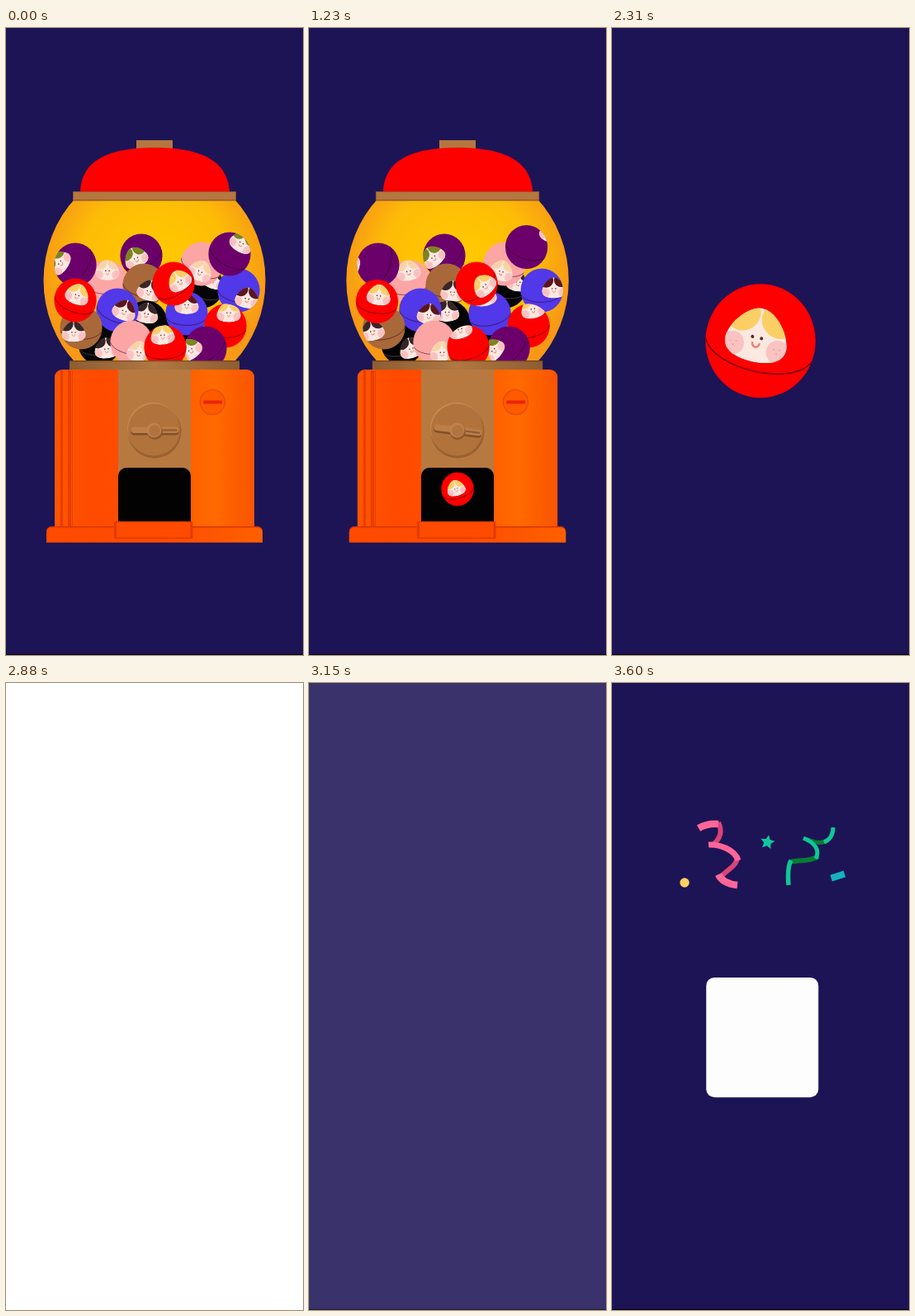
These frames come from a looping animation (360 px wide and 760 px high, 4.5 s). An HTML page with a canvas:

```html
<!DOCTYPE html>
<html lang="en">
<head>
<meta charset="utf-8">
<title>Capsule machine</title>
<style>
html, body { margin: 0; width: 100%; height: 100%; overflow: hidden; background: #1d1456; }
canvas { display: block; width: 100%; height: 100%; }
</style>
</head>
<body>
<canvas id="stage"></canvas>
<script>
const W = 360, H = 760, LOOP = 4500, STEP = 30;
const canvas = document.getElementById('stage');
const ratio = window.devicePixelRatio || 1;
canvas.width = W * ratio;
canvas.height = H * ratio;
const c = canvas.getContext('2d');
c.scale(ratio, ratio);

const NAVY = '#1d1456', BROWN = '#b5763f', STRETCH = 1.035;
const KINDS = {
  red: ['#fe0000', '#fbcf66'],
  purple: ['#6b006b', '#7d8420'],
  blue: ['#5138e8', '#5a1620'],
  brown: ['#a9683a', '#3a2628'],
  pink: ['#fca5a5', '#f8d3a8'],
  black: ['#050505', '#352526']
};

// kind, centre, face offset at rest, face offset when shaken, tilt, travel
const BALLS = [
  ['black', 238, 313, 13, -7, 8, -14, 20],
  ['pink', 237, 286, -2, 10, 3, 10, 25],
  ['pink', 122, 308, 1, -12, 5, -13, 0],
  ['purple', 164, 276, -6, 4, 8, 7, -25],
  ['brown', 167, 312, 6, 8, 4, 6, 15],
  ['black', 205, 372, 50, 0, 50, 0, 0],
  ['black', 170, 357, 0, -9, 5, -5, 10],
  ['black', 113, 382, 9, 8, 4, 9, -5],
  ['blue', 135, 342, 8, 2, 3, -8, 20],
  ['blue', 219, 346, 0, -9, 13, 11, 0],
  ['blue', 282, 318, 10, 11, 0, 36, 10],
  ['purple', 271, 274, 14, -12, -20, -6, 30, 16, 18],
  ['purple', 84, 287, -18, -2, 14, -13, -55],
  ['brown', 91, 363, -9, 7, 1, 10, 0],
  ['red', 84, 330, 2, -5, 2, -4, 20, 3, -3],
  ['red', 203, 310, 8, -2, 3, -13, -30],
  ['red', 266, 361, 4, -14, 1, -4, 0],
  ['pink', 152, 381, 9, 13, 8, 13, 10],
  ['purple', 242, 388, -18, 3, -18, 3, -35],
  ['red', 193, 387, -3, -13, 11, 2, -5]
];

const clamp = v => Math.max(0, Math.min(1, v));
const part = (t, from, to) => clamp((t - from) / (to - from));
const ease = v => v < .5 ? 2 * v * v : 1 - 2 * (1 - v) * (1 - v);
const mix = (a, b, v) => a + (b - a) * v;
const rad = deg => deg * Math.PI / 180;

function fill(color, x, y, w, h, r = 0) {
  c.fillStyle = color;
  c.beginPath();
  c.roundRect(x, y, w, h, r);
  c.fill();
}

function oval(color, x, y, rx, ry = rx) {
  c.fillStyle = color;
  c.beginPath();
  c.ellipse(x, y, rx, ry, 0, 0, 7);
  c.fill();
}

function stroke(color, width, path) {
  c.strokeStyle = color;
  c.lineWidth = width;
  c.stroke(new Path2D(path));
}

function shade(x0, x1, ...stops) {
  const g = c.createLinearGradient(x0, 0, x1, 0);
  stops.forEach((color, i) => g.addColorStop(i / (stops.length - 1), color));
  return g;
}

const FACE = new Path2D('M0-38C18-38 38-12 38 4C38 20 20 26 0 26C-20 26-38 20-38 4C-38-12-18-38 0-38Z');

function drawFace(hair) {
  c.clip(FACE);
  c.fillStyle = '#fbe8e1';
  c.fill(FACE);
  for (const side of [-1, 1]) {
    oval(hair, side * 24, -29, 23, 22);
    oval('#f9c3c1', side * 28, 9, 14);
    for (const [x, y] of [[-4, 7], [3, 6], [0, 11]]) oval('#ee9a98', side * 27 + x, y, 1);
    oval('#5a2a22', side * 5.6, -3, 2);
  }
  stroke('#ef7f72', 2.4, 'M-4.500 3C-4.500 10 4.500 10 4.500 3');
}

function drawBall(kind, x, y, r, deg, fx, fy) {
  const [color, hair] = KINDS[kind], s = r / 67;
  c.save();
  c.translate(x, y);
  c.scale(s, s * STRETCH);
  oval(color, 0, 0, 67);
  c.clip();
  c.save();
  c.rotate(rad(deg));
  stroke(kind === 'black' ? '#4b3c40' : 'rgba(45,0,18,.65)', Math.max(1.5, .8 / s), 'M-66 11C-50 45 50 45 66 11');
  c.restore();
  c.translate(fx / s, fy / s);
  c.rotate(rad(deg));
  drawFace(hair);
  c.restore();
}

function drawGlobe(pose) {
  c.save();
  c.beginPath();
  c.rect(40, 205, 280, 200);
  c.clip();
  const glow = c.createRadialGradient(180, 285, 20, 180, 290, 140);
  glow.addColorStop(0, '#ffc800');
  glow.addColorStop(.6, '#fdbb06');
  glow.addColorStop(1, '#f79816');
  oval(glow, 180, 306, 134.5, 142);
  c.clip();
  for (const [kind, x, y, ax, ay, bx, by, tilt, dx = 0, dy = 0] of BALLS) {
    drawBall(kind, x + dx * pose, y + dy * pose, 25.6, tilt + 25 * pose,
      mix(ax, bx, pose), mix(ay, by, pose));
  }
  c.restore();
}

function drawKnob(deg) {
  oval('rgba(80,40,15,.3)', 180, 489, 32.5);
  oval('#c88a50', 178.5, 485.5, 31.5);
  oval('#b1723b', 179.5, 487, 31.5);
  c.save();
  c.translate(179.500, 487.500);
  c.rotate(rad(deg));
  fill('#80502a', -28, -3, 58, 9, 4);
  fill('#bd7f47', -28, -4, 58, 7.5, 4);
  fill('#8d592f', 10, -1, 18, 2, 1);
  oval('#8a5830', 1, 2, 9.5);
  oval('#c0834b', 0, 0, 9);
  oval('#b1743e', .7, .7, 7);
  c.restore();
}

function drawMachine(pose) {
  c.save();
  c.translate(180, 380);
  c.scale(1 + .004 * Math.abs(pose), 1);
  c.translate(-180, -380);

  drawGlobe(pose);

  fill(BROWN, 158, 136, 44, 11);
  c.fillStyle = '#fe0000';
  c.fill(new Path2D('M90 199C91 166 115 145 180 145C245 145 269 166 271 199Z'));
  fill('#8f5a2d', 81, 198, 198, 11.500);
  fill(BROWN, 82, 199, 196, 9);

  fill(shade(77, 283, '#8d5d33', '#b07842', '#8d5d33'), 77, 403, 206, 11.500);
  fill('rgba(70,35,10,.45)', 77, 403, 206, 1.200);

  fill(shade(59, 301, '#ff5500', '#ff4a00', '#ff4f00', '#ff5a00', '#ff6a00', '#fa5400'), 59, 414, 242, 191, [9, 9, 0, 0]);
  for (const [x, w] of [[66, 3], [75, 4], [80, 1]]) fill('rgba(205,42,0,.5)', x, 415, w, 189);
  fill('#b87941', 136, 414, 88, 125);
  fill('#020202', 136, 533, 88, 67, [10, 10, 0, 0]);

  oval('#dc4600', 250.300, 453.500, 15.500);
  oval('#ff5a00', 250.300, 453.500, 14.500);
  fill('#e92300', 239, 451.500, 23, 4, 1);

  fill('#d73600', 49, 604, 262, 19.500, [6, 6, 0, 0]);
  fill(shade(49, 311, '#ff4a00', '#ff4a00', '#ff6000'), 49, 605.500, 262, 18, [6, 6, 0, 0]);
  fill('#e03a00', 131, 598, 95.500, 21, 2);
  fill('#ff4a00', 134, 599, 89.500, 18.500);

  drawKnob(-15 * pose);
  c.restore();
}

function drawPrize(t) {
  const out = ease(part(t, 1150, 1680));
  const grow = ease(part(t, 1680, 2220));
  const swing = ease(part(t, 2220, 2550));
  const r = mix(mix(18, 56.300, out), 66.700, grow);
  const y = mix(mix(566, 410, out), 379.300, grow);
  const deg = mix(mix(-15, 17, grow), -15, swing);
  const shift = -5 * r / 67;
  drawBall('red', 180, y, r, deg, shift * Math.cos(rad(deg)), shift * Math.sin(rad(deg)));
}

function drawCard(t) {
  const k = part(t, 3180, 3600), s = mix(.638, 1, k);
  c.save();
  c.globalAlpha = part(t, 3180, 3420);
  c.translate(182.200, 429.600 + 123.700 * (1 - k));
  c.scale(s, s);
  fill('#fdfdfd', -68, -72.700, 136, 145.400, 10);
  c.restore();
}

function drawStar(x, y, r) {
  c.fillStyle = '#12c79c';
  c.beginPath();
  for (let i = 0; i < 10; i++) {
    const a = rad(i * 36 - 80), d = i % 2 ? r * .48 : r;
    c.lineTo(x + d * Math.cos(a), y + d * Math.sin(a));
  }
  c.fill();
}

function drawConfetti(t) {
  const k = part(t, 3330, 3600), s = mix(.5, 1, ease(k));
  c.save();
  c.globalAlpha = k;
  c.translate(182, 250);
  c.scale(s, s);
  c.translate(-182, -250);

  stroke('#d94478', 6, 'M129 169C134 179 132 189 121 197');
  stroke('#d94478', 6, 'M152 211C151 223 139 226 131 236');
  stroke('#ff6698', 8.500, 'M105 176C112 172 119 170 129 171');
  stroke('#ff6698', 7, 'M117 196C130 195 149 202 153 215');
  stroke('#ff6698', 8.500, 'M129 232C133 241 142 244 152 245');

  stroke('#087c32', 5, 'M262 190C254 196 245 193 235 189');
  stroke('#087c32', 6, 'M250 210C240 217 228 214 216 217');
  stroke('#10c795', 5, 'M268 175C268 185 264 190 257 193');
  stroke('#10c795', 5, 'M232 188C247 194 252 203 247 213');
  stroke('#10c795', 5.500, 'M217 215C213 222 213 233 214 245');

  drawStar(188.500, 193, 9);
  oval('#ffd060', 88, 242, 5.700);
  c.translate(273.800, 234);
  c.rotate(rad(-18));
  fill('#16b2bd', -8.500, -4, 17, 8);
  c.restore();
}

function shakePose(t) {
  if (t < 600) return 1.27 * ease(part(t, 90, 600));
  if (t < 1140) return mix(1.27, -.5, ease(part(t, 600, 1140)));
  return mix(-.5, 0, ease(part(t, 1140, 1680)));
}

function flashAlpha(t) {
  return t < 2940 ? part(t, 2790, 2880) : 1 - part(t, 2940, 3180);
}

function draw(t) {
  fill(NAVY, 0, 0, W, H);
  if (t < 2220) {
    drawMachine(shakePose(t));
    c.globalAlpha = ease(part(t, 1680, 2220));
    fill(NAVY, 0, 0, W, H);
    c.globalAlpha = 1;
  }
  fill('#070512', 0, 758.700, W, 1.300);
  if (t >= 1170 && t < 2910) drawPrize(t);
  if (t >= 2820 && t < 3180) fill(`rgba(255,255,255,${flashAlpha(t)})`, 0, 0, W, H);
  if (t >= 3180) drawCard(t);
  if (t >= 3360) drawConfetti(t);
}

const start = performance.now();
function tick() {
  const t = (performance.now() - start) % LOOP;
  draw(Math.floor(t / STEP) * STEP);
  requestAnimationFrame(tick);
}
tick();
</script>
</body>
</html>
```
